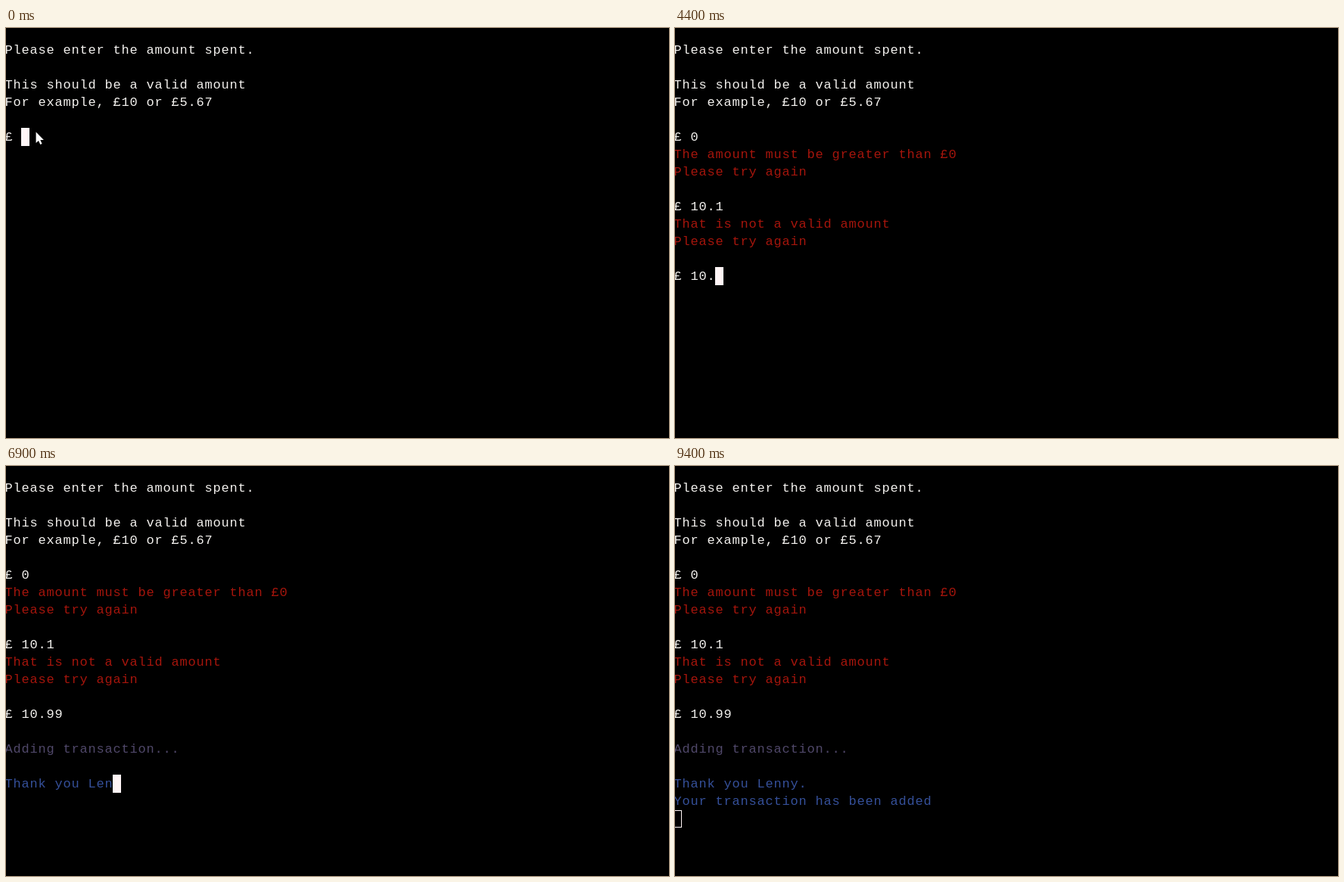
Recreate the animation shown at these times as an HTML page with a canvas. Size 876 by 542 pixels, loop 9700 ms.

```html
<!DOCTYPE html>
<html lang="en">
<head>
<meta charset="utf-8">
<title>Terminal session</title>
<style>
  html, body { margin: 0; width: 100%; height: 100%; overflow: hidden; background: #000; }
  canvas { display: block; }
</style>
</head>
<body>
<canvas id="stage" width="876" height="542"></canvas>
<script>
const ctx = document.getElementById('stage').getContext('2d', { alpha: false });

const LOOP = 9700;
const CELL = 11, LINE = 23, LEFT = -2, TOP = 17, BASELINE = 17;
const WHITE = '#f3f1ee', RED = '#a5150c', SLATE = '#50486a', BLUE = '#35509a';
const CURSOR = '#fff5f6';

const INTRO = [
  'Please enter the amount spent.', '',
  'This should be a valid amount',
  'For example, £10 or £5.67', ''
];
const THANKS = 'Thank you Lenny.\nYour transaction has been added\n';

// Each prompt: when it appears, when each key lands, and the reply that follows
const PROMPTS = [
  { from: 0, text: '0', keys: [100], enter: 200,
    reply: ['The amount must be greater than £0', 'Please try again', ''], color: RED },
  { from: 200, text: '10.1', keys: [1500, 1600, 2000, 2400], enter: 3100,
    reply: ['That is not a valid amount', 'Please try again', ''], color: RED },
  { from: 3100, text: '10.99', keys: [3800, 4000, 4400, 5000, 5300], enter: 6100,
    reply: ['', 'Adding transaction...', ''], color: SLATE }
];

const TYPE_START = 6300, BLUR_AT = 9400;

function screenAt(t) {
  const rows = [];
  const add = (lines, color) => lines.forEach(text => rows.push({ text, color }));
  add(INTRO, WHITE);
  for (const p of PROMPTS) {
    if (t < p.from) break;
    const typed = p.keys.filter(k => t >= k).length;
    add(['£ ' + p.text.slice(0, typed)], WHITE);
    if (t >= p.enter) add(p.reply, p.color);
  }
  if (t >= PROMPTS[2].enter) {
    // Two characters per 100 ms tick, starting with one
    const count = t < TYPE_START ? 0 : 1 + 2 * Math.floor((t - TYPE_START) / 100);
    add(THANKS.slice(0, count).split('\n'), BLUE);
  }
  return rows;
}

function drawCursor(row, col, focused) {
  const x = LEFT + col * CELL, y = TOP + row * LINE;
  if (focused) {
    ctx.fillStyle = CURSOR;
    ctx.fillRect(x, y, CELL, LINE + 1);
  } else {
    ctx.strokeStyle = CURSOR;
    ctx.lineWidth = 1;
    ctx.strokeRect(x + 0.5, y + 1.5, CELL - 1, LINE - 1);
  }
}

function drawPointer(x, y) {
  const shape = [[0, 0], [0, 14.5], [3.4, 11.4], [5.7, 16.6], [8, 15.6], [5.7, 10.6], [10.3, 10.4]];
  ctx.beginPath();
  shape.forEach(([dx, dy]) => ctx.lineTo(x + dx, y + dy));
  ctx.closePath();
  ctx.fillStyle = '#fff';
  ctx.fill();
}

function draw(t) {
  ctx.fillStyle = '#000';
  ctx.fillRect(0, 0, 876, 542);
  ctx.font = '17px "Liberation Mono", monospace';
  ctx.textBaseline = 'alphabetic';
  ctx.letterSpacing = '0px';
  ctx.letterSpacing = CELL - ctx.measureText('0').width + 'px';

  const rows = screenAt(t);
  rows.forEach(({ text, color }, i) => {
    ctx.fillStyle = color;
    ctx.fillText(text, LEFT + 0.4, TOP + BASELINE + i * LINE);
  });
  const last = rows.length - 1;
  drawCursor(last, rows[last].text.length, t < BLUR_AT);
  if (t < 100) drawPointer(39.6, 137.5);
}

const start = performance.now();
function tick() {
  draw((performance.now() - start) % LOOP);
  requestAnimationFrame(tick);
}
tick();
</script>
</body>
</html>
```
